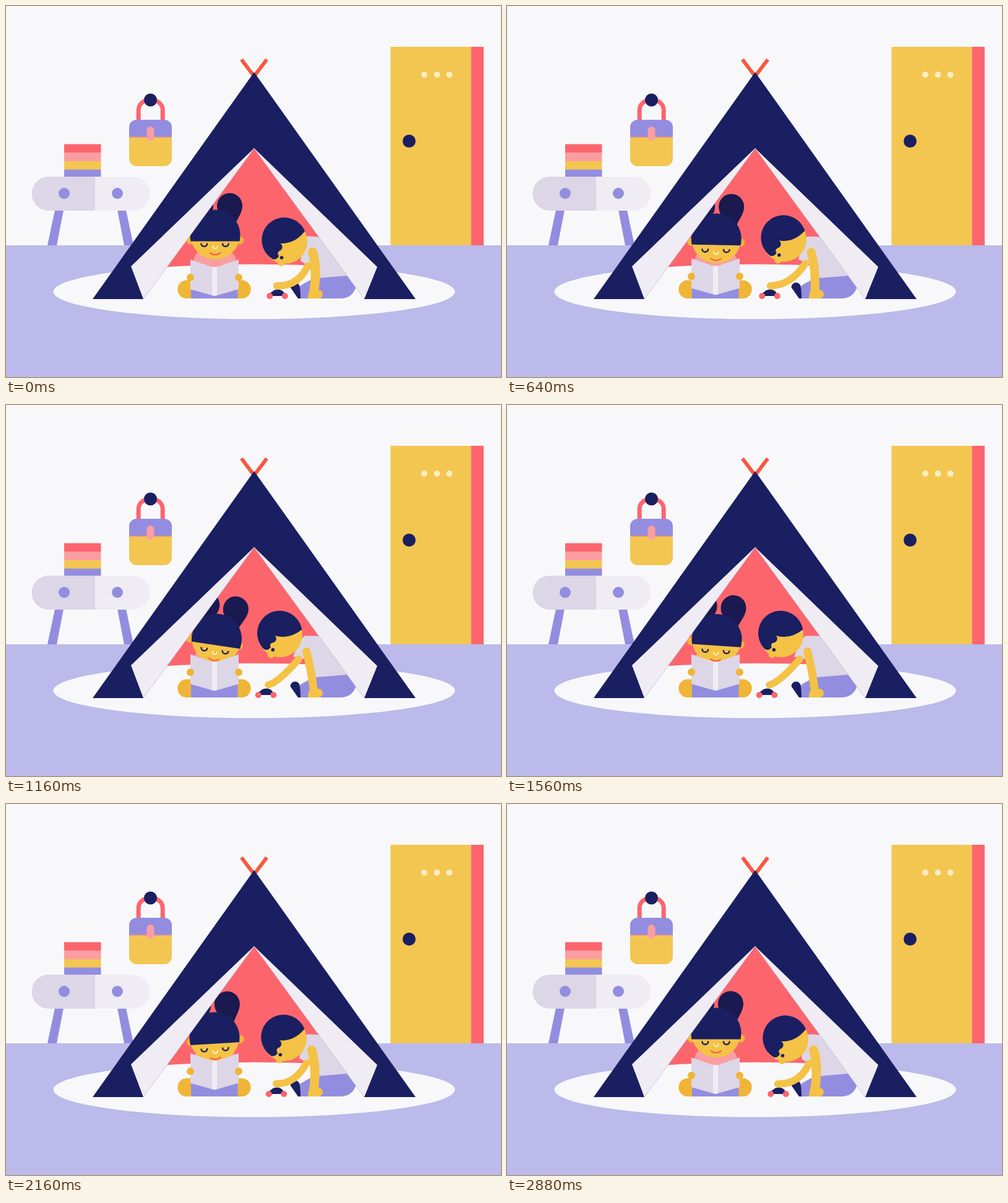
Recreate the animation shown at these times as an HTML page. Size 800 by 600 pixels, loop 2920 ms.

```html
<!DOCTYPE html>
<html lang="en">
<head>
<meta charset="utf-8">
<title>Play tent</title>
<style>
html, body { margin: 0; width: 100%; height: 100%; overflow: hidden; background: #f8f8fb; }
svg { display: block; width: 800px; height: 600px; }
.navy { fill: #1a1f61; } .coral { fill: #fd656d; } .pink { fill: #fa9ea2; }
.yellow { fill: #f3c651; } .violet { fill: #938de0; } .grey { fill: #ddd6e6; }
.pale { fill: #efedf3; } .skin { fill: #f4c245; } .amber { fill: #f0b537; }
.line { fill: none; stroke-linecap: round; }
</style>
</head>
<body>
<svg viewBox="0 0 800 600">
  <rect width="800" height="600" fill="#f8f8fb"/>
  <rect y="387" width="800" height="213" fill="#bbbaea"/>

  <!-- door -->
  <rect class="yellow" x="621.5" y="66" width="130" height="321"/>
  <rect class="coral" x="751.5" y="66" width="20.5" height="321"/>
  <circle class="navy" cx="651.5" cy="218.5" r="10.5"/>
  <g fill="#fbedc0">
    <circle cx="676" cy="111" r="5"/><circle cx="696.5" cy="111" r="5"/><circle cx="716.5" cy="111" r="5"/>
  </g>

  <!-- table and books -->
  <path class="violet" d="M79 330H93L82 387H67ZM180 330H194L206 387H191Z"/>
  <path class="grey" d="M144 276H69a27.5 27.5 0 0 0 0 55H144Z"/>
  <path class="pale" d="M144 276H205a27.5 27.5 0 0 1 0 55H144Z"/>
  <circle class="violet" cx="94" cy="303" r="9"/>
  <circle class="violet" cx="180" cy="303" r="9"/>
  <rect class="coral" x="94" y="223.5" width="59.5" height="14"/>
  <rect class="pink" x="94" y="237" width="59.5" height="14"/>
  <rect class="yellow" x="94" y="251" width="59.5" height="14"/>
  <rect class="violet" x="94" y="264.5" width="59.5" height="11.5"/>

  <!-- bag -->
  <path d="M214.2 186V168a15 15 0 0 1 15-15h9a15 15 0 0 1 15 15V186" fill="none" stroke="#fd656d" stroke-width="7"/>
  <circle class="navy" cx="233.5" cy="152" r="10.5"/>
  <path class="violet" d="M199 212V196a12 12 0 0 1 12-12h45a12 12 0 0 1 12 12V212Z"/>
  <path class="yellow" d="M199 212H268V247a12 12 0 0 1-12 12H211a12 12 0 0 1-12-12Z"/>
  <path d="M199 212.3H268" stroke="#f39a78" stroke-width="1.4"/>
  <rect class="pink" x="227.5" y="195" width="12" height="23" rx="6"/>

  <!-- tent lining and rug -->
  <path class="coral" d="M401 230L250 436H552Z"/>
  <ellipse cx="401" cy="462" rx="324.5" ry="44.3" fill="#f8f8fb"/>

  <!-- girl -->
  <path class="pink" d="M303 440V412Q305 396 325 394H350Q370 396 372 412V440Z"/>
  <path class="amber" d="M299 443.500H292a14.700 14.700 0 0 0 0 29.500H299ZM374 443.500H381a14.700 14.700 0 0 1 0 29.500H374Z"/>
  <rect class="violet" x="299" y="446" width="75.500" height="27"/>
  <g id="girl">
    <g id="buns" fill="#1a1950">
      <path id="bun" d="M-20.500 0A20.500 20.500 0 0 1 20.500 0C20.500 11 13 20 9 30L-12 22C-15 14-20.500 11-20.500 0Z" transform="translate(23.500 -47)"/>
      <use href="#bun" transform="scale(-1 1)"/>
    </g>
    <g id="ears" class="amber"><circle cx="-40" cy="9" r="6.500"/><circle cx="40" cy="9" r="6.500"/></g>
    <circle class="skin" r="40"/>
    <path class="navy" d="M-39.500 10.500Q-40.500 5-40.500 0A40.500 40.500 0 0 1 40.500 0Q40.500 5 39.500 10.500Z"/>
    <g id="face" class="line" stroke-width="2.400">
      <path d="M-22.500 14.500a4.800 4.300 0 0 0 9.600 0M12 14.500a4.800 4.300 0 0 0 9.600 0" stroke="#1a1f61"/>
      <path d="M-3.500 18.500a3.700 3.700 0 0 0 7.400 0" stroke="#fdf0cf" stroke-width="2"/>
      <path d="M-8 29.500Q0 35 8 29.500" stroke="#f4604f" stroke-width="2.200"/>
    </g>
  </g>
  <g id="book">
    <path class="grey" d="M298 410L333 422V468L298 458ZM376 410L341 422V468L376 458Z"/>
    <path class="pale" d="M333 422H341V468L337 469L333 468Z"/>
    <circle class="amber" cx="298" cy="439" r="6"/><circle class="amber" cx="376" cy="439" r="6"/>
  </g>

  <!-- boy -->
  <path id="shirt" class="grey"/>
  <path class="violet" d="M476 473L475 453Q485 446 498 440.500L553 436Q570 436 567 450Q562 473 540 473Z"/>
  <path class="navy" d="M459.500 455a7.700 7.700 0 0 1 15.400 0Q476 460 476 473H472Z"/>
  <g id="car">
    <path class="navy" d="M-13 469Q-12 463-8 462Q-6 458.500 1 458.500Q8 458.500 11 464L13 469Z"/>
    <circle class="coral" cx="-12.300" cy="469" r="5"/><circle class="coral" cx="12.300" cy="469" r="5"/>
  </g>
  <g class="line" stroke="#f4c245">
    <path id="reach" stroke-width="11.500"/>
  </g>
  <g id="boy">
    <circle class="skin" r="36"/>
    <ellipse class="skin" cx="-6.500" cy="35" rx="5.500" ry="4.800"/>
    <path class="navy" d="M32 -17A36.300 36.300 0 1 0-20 28.500Q-13 30-10 23Q-14 18-9 15A6.500 6.500 0 0 0-8 3Q16 4 32-17Z"/>
    <circle class="navy" cx="-5.500" cy="26" r="2.800"/>
  </g>
  <path id="prop" class="line" stroke="#f4c245" stroke-width="14"/>
  <path class="skin" d="M488 473Q488 459 496 459H505a7 7 0 0 1 0 14Z"/>

  <!-- tent -->
  <path d="M380.500 86.500L402 115M421.500 86.500L400 115" stroke="#f9573e" stroke-width="6"/>
  <path class="navy" d="M401 107L140 474H222L401 230L579 474H662Z"/>
  <path class="pale" d="M401 230L202 421L222 474ZM401 230L600 422L579 474Z"/>
  <path d="M401 230L222 474M401 230L579 474" stroke="#d3cede" stroke-width=".8"/>
</svg>
<script>
const LOOP = 2920, STEP = 40;
const TIMES = [0, 640, 1160, 1560, 2160, 2560, 2880, LOOP];
const $ = id => document.getElementById(id);
const set = (id, name, value) => $(id).setAttribute(name, value);
const move = (id, x, y, turn = 0) => set(id, 'transform', `translate(${x} ${y}) rotate(${turn})`);

// Smooth curve through keys that never overshoots them
function track(values, times = TIMES) {
  const n = times.length - 1;
  const rate = i => (values[i + 1] - values[i]) / (times[i + 1] - times[i]);
  const slope = i => {
    if (i < 1 || i >= n) return 0;
    const a = rate(i - 1), b = rate(i);
    return a * b > 0 ? 2 * a * b / (a + b) : 0;
  };
  return t => {
    let i = 0;
    while (i < n - 1 && t >= times[i + 1]) i++;
    const h = times[i + 1] - times[i], u = (t - times[i]) / h, v = 1 - u;
    return v * v * (1 + 2 * u) * values[i] + u * u * (3 - 2 * u) * values[i + 1]
      + h * u * v * (v * slope(i) - u * slope(i + 1));
  };
}

const dip = track([0, 6, 8, 8.6, 7.2, 1.2, 0, 0]);
const tilt = track([0, 1, 8.4, 3.8, -3.4, -.9, 0, 0]);
const lift = track([0, 1.8, 6.7, 7, 6.8, 3, .1, 0]);
const nod = track([0, .7, 1, 1, 1.1, .5, 0, 0], [0, 320, 640, 1160, 2160, 2560, 2880, LOOP]);
const drive = track([0, .757, 1, 1, .08, 0, 0, 0]);
const lean = track([0, .4, 1, 1, .15, 0, 0, 0]);

// Blend two paths that share the same commands
function blend(a, b, p) {
  const to = b.match(/[\d.]+/g);
  let i = 0;
  return a.replace(/[\d.]+/g, n => +n + (to[i++] - n) * p);
}

function draw(now) {
  const t = Math.floor(now % LOOP / STEP) * STEP;
  const turn = tilt(t), down = nod(t), p = lean(t), carX = 438.5 - 18.5 * drive(t);

  move('girl', 338 + .3 * turn, 370 + dip(t), turn);
  move('buns', 0, -5 * down);
  move('ears', -.35 * turn, -3 * down);
  move('face', 0, 3.3 * down);
  move('book', 0, -lift(t));

  move('car', carX, 0);
  move('boy', 451 - 8 * p, 381 - 9 * p, 14 * p);
  set('shirt', 'd', blend(
    'M480 380L487 372.5Q498 372 508 374L556 437L494 443L491 422L476 412Z',
    'M474 382L482 373.5Q498 373 508 374L556 437L498 442L488 412L464 407Z', p));
  set('reach', 'd', `M${carX - 1 + 5 * p} 452.500` + blend('Q472 454 488 420', 'Q440 449 473 411', p));
  set('prop', 'd', blend('M495.500 398Q504 424 497 465', 'M485.500 398.500Q493 428 498 465', p));
  set('prop', 'stroke-width', 15 - 2 * p);
  requestAnimationFrame(() => draw(performance.now()));
}
draw(0);
</script>
</body>
</html>
```
